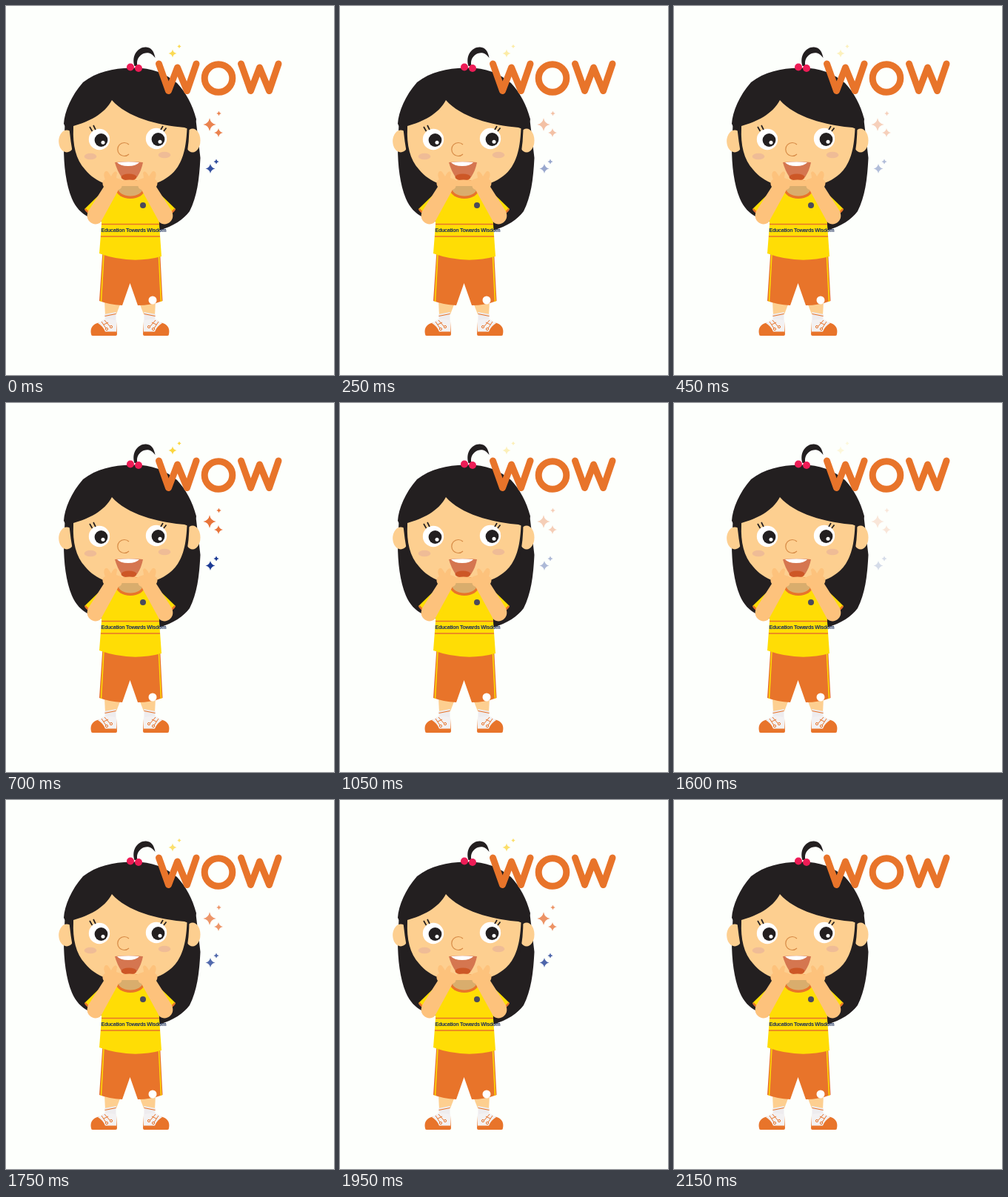
An HTML page that plays this animation: 443 by 498 pixels, repeating every 2200 ms.

```html
<!DOCTYPE html>
<html lang="en">
<head>
<meta charset="utf-8">
<title>Wow</title>
<style>
html, body { margin: 0; width: 100%; height: 100%; overflow: hidden; background: #fdfffc; }
svg { display: block; width: 443px; height: 498px; }
.hair { fill: #231f20; }
.skin { fill: #fdcf90; }
.arm { fill: #fdc27c; }
.orange { fill: #e8742a; }
.yellow { fill: #ffdd05; }
.line { fill: none; stroke: #e8742a; }
.slogan { font: bold 7.2px "Liberation Sans", Arial, sans-serif; letter-spacing: -.33px; fill: #1b2f5c; }
</style>
</head>
<body>
<svg viewBox="0 0 443 498">
  <defs>
    <path id="star" d="M0-1Q.16-.16 1 0Q.16 .16 0 1Q-.16 .16-1 0Q-.16-.16 0-1Z"/>
    <path id="w" d="M206.500 78L219.500 114.500L231.500 83L244.500 114.500L257 78"/>
    <g id="leg">
      <path class="skin" d="M133 398H156L149 416L134 418Z"/>
      <path d="M133 416L148.500 413V432H135Z" fill="#eeecee"/>
      <path class="line" d="M133.500 418.500L148.500 415.500" stroke-width="1.200"/>
      <path class="orange" d="M115 443C113 434 118 429 125 427.500L149 426L150 443Q150 445 148 445H117Q115 445 115 443Z"/>
      <path d="M124 428L134 422L149 424V439.500H134Q131 432 124 428Z" fill="#f3f1f2"/>
      <path class="line" d="M129 426L135 435M133 424L140 432M132 430L138 427" stroke-width="1"/>
      <circle class="line" cx="136" cy="436" r="1.600"/>
      <circle class="line" cx="142" cy="433" r="1.600"/>
    </g>
    <g id="arm">
      <path class="yellow" d="M137 244L106 274L114 282L140 284Z"/>
      <path class="line" d="M107 274Q110 279 116 281" stroke-width="2.500"/>
      <path class="arm" d="M132 244C129 239 131 235 134 234C130 227 134 220 138 224L142 230Q147 220 150 225L149 232L155 234Q159 236 156 240Q158 246 152 248L130 288C127 296 118 296 113 291C109 287 109 282 111 277Z"/>
    </g>
    <g id="eye">
      <circle r="14.200" fill="#fff"/>
      <circle cx="2.500" cy="1" r="8.900" class="hair"/>
      <circle cx="5" cy="4.200" r="2.500" fill="#fff"/>
    </g>
  </defs>

  <path class="hair" d="M80 150L78 190C78 215 81 241 89 260C94 272 102 280 112 285L165 303H207C226 297 240 288 248 277C258 257 261 235 262.500 205L256 150Z"/>
  <ellipse class="skin" cx="82" cy="182.500" rx="10.800" ry="15"/>
  <ellipse class="skin" cx="252" cy="181.500" rx="10.500" ry="16"/>
  <path class="hair" d="M84.500 155H93L91.500 205Q87 185 84.500 155ZM240 155H247.500Q248 185 243 206Z"/>
  <path class="skin" d="M91 125V165C90 187 94 207 107 221C122 239 143 245 168 245C193 245 219 237 232 217C241 203 245 184 245 145V125Z"/>

  <use href="#leg"/>
  <use href="#leg" transform="matrix(-1 0 0 1 335 0)"/>
  <path class="orange" d="M130.500 330H208L211.500 398Q196 404 178 404L167.500 374L157 404Q139 403 126 398Z"/>
  <path d="M132 335L128.500 399M206.500 339L209.500 399" fill="none" stroke="#ffdd05" stroke-width="1.500"/>
  <circle cx="198" cy="397" r="5.500" fill="#fff"/>

  <path class="yellow" d="M137 244L150 243H186L199 244L206 262L207 295L210 338Q168 349 126 334L129 295V262Z"/>
  <ellipse class="orange" cx="168" cy="247" rx="19.500" ry="13"/>
  <ellipse cx="168" cy="246.500" rx="16.500" ry="10" fill="#d9ad6d"/>
  <path class="line" d="M129 294.500H207M128 311H208" stroke-width="1.600"/>
  <text class="slogan" x="128.500" y="305">Education Towards Wisdom</text>
  <circle cx="185" cy="269" r="4" fill="#4b4a5c"/>

  <path d="M147 211Q166 209 185 211Q183 222 177 231H156Q150 222 147 211Z" fill="#d57650"/>
  <path d="M150 211Q166 209.500 180 211Q176 216 165 216Q154 216 150 211Z" fill="#fff"/>
  <ellipse cx="166" cy="231" rx="10.500" ry="4.500" fill="#cd5726"/>
  <path class="arm" d="M154 236Q166 233 181 236V243H154Z"/>
  <use href="#arm"/>
  <use href="#arm" transform="matrix(-1 0 0 1 335 0)"/>

  <ellipse cx="114" cy="203" rx="8.300" ry="4.300" fill="#efbc96"/>
  <ellipse cx="214" cy="201" rx="8.300" ry="4.300" fill="#efbc96"/>
  <path d="M166 187A9 9 0 1 0 166 200" fill="none" stroke="#d68a45" stroke-width="1.200"/>
  <use href="#eye" x="126" y="180"/>
  <use href="#eye" x="203" y="179"/>
  <path d="M113 163L116.500 169M118 161L121 167M209 167L212 162M213 169L216.500 164.500" stroke="#231f20" stroke-width="1.700"/>

  <path class="hair" d="M78 159C79 143 88 121 104 103C122 89 145 84 168 83.500C195 82.500 214 90 231 104C243 117 252 133 257 153Q254 170 241 164C205 161 163 150 143 127C133 146 112 156 91 162Q83 170 78 159Z"/>
  <path class="hair" d="M173.500 81C169 66 179 55 189 55.500C197 56 200 62 201.500 70C196 62 189 62 184 65C178 69 176 74 177.500 81Z"/>
  <circle cx="168" cy="82.500" r="5" fill="#ed1c56"/>
  <circle cx="179" cy="84" r="5" fill="#ed1c56"/>

  <g class="line" role="img" aria-label="WOW" stroke-width="9" stroke-linecap="round" stroke-linejoin="round">
    <use href="#w"/>
    <circle cx="287" cy="97.500" r="18.800"/>
    <use href="#w" x="111"/>
  </g>
  <g id="sparkles"></g>
</svg>
<script>
const sparkles = document.getElementById("sparkles");
const stars = [
  [225, 64, 5.5, "#fbd63f"], [234, 54.5, 2.7, "#fbd63f"],
  [275, 160, 8.7, "#e8743a"], [287, 171, 6, "#e8743a"], [287.5, 145, 3.3, "#e8743a"],
  [276, 219.5, 6.5, "#1b3a94"], [284, 210, 3.6, "#1b3a94"]
];
sparkles.innerHTML = stars.map(([x, y, r, color]) =>
  `<use href="#star" fill="${color}" transform="translate(${x} ${y}) scale(${r})"/>`).join("");

const LOOP = 2200, STEP = 50, PULSE = 595, PEAK = 67.5;
const start = performance.now();

function draw(now) {
  const t = Math.floor(Math.max(0, now - start) % LOOP / STEP) * STEP;
  const phase = (t - PEAK + PULSE) % PULSE / PULSE;
  // triangle wave with a short hold at full strength
  sparkles.setAttribute("opacity", Math.min(1, 1.15 * Math.abs(1 - 2 * phase)));
  requestAnimationFrame(draw);
}
draw(start);
</script>
</body>
</html>
```
